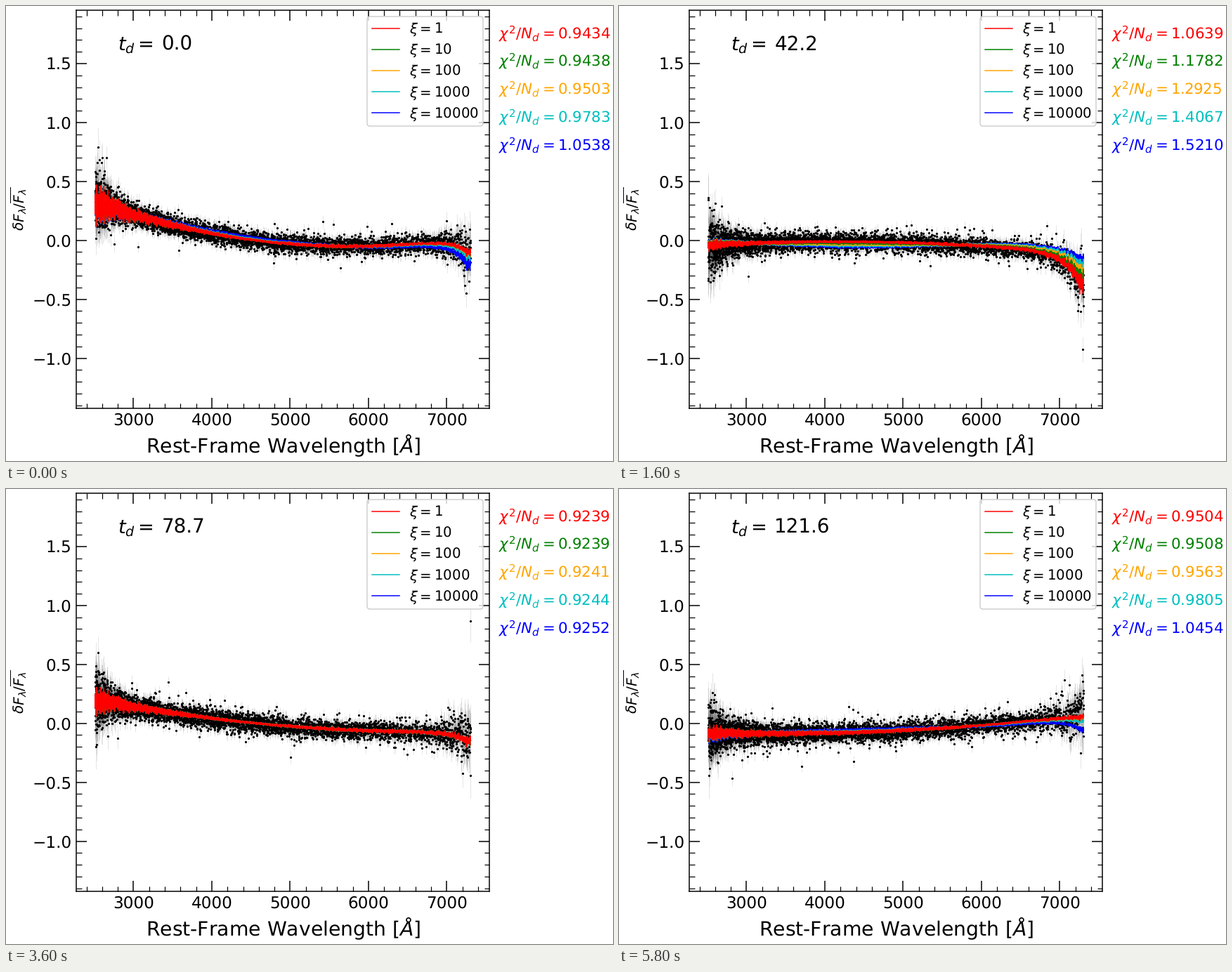
A matplotlib script for the animation above (6000 ms loop, 864x648 px).

```python
import numpy as np
import matplotlib.pyplot as plt
from matplotlib.animation import FuncAnimation
from matplotlib.collections import LineCollection
from matplotlib.patches import FancyBboxPatch
from matplotlib.ticker import AutoMinorLocator, MultipleLocator

W, H = 864, 648
FRAMES, INTERVAL = 30, 200
COLORS = ["r", "g", "orange", "c", "b"]

plt.rcParams.update({"font.family": "DejaVu Sans", "text.hinting": "none"})

# epoch, days, lowest and highest chi2, levels at KNOTS, bend of stiff fits, noise
KNOTS = [2510, 5000, 6700, 7300]
KEYS = np.array([
    (0, 0.0, 0.9434, 1.0538, 0.32, -0.03, -0.02, -0.12, 0.02, 0.09),
    (5, 37.3, 0.9866, 1.1084, -0.11, -0.25, -0.40, -0.80, -0.04, 0.25),
    (8, 42.2, 1.0639, 1.5210, -0.04, -0.02, -0.08, -0.42, -0.04, 0.08),
    (14, 62.6, 0.9383, 1.0278, -0.06, -0.125, -0.11, -0.20, -0.02, 0.10),
    (18, 78.7, 0.9239, 0.9252, 0.20, -0.025, -0.07, -0.17, 0.0, 0.10),
    (25, 104.0, 0.9035, 1.0597, 0.07, 0.21, 0.345, 0.62, 0.045, 0.17),
    (29, 121.6, 0.9504, 1.0454, -0.08, -0.06, 0.025, 0.05, 0.02, 0.11),
])

# Logarithmic wavelength grid
lam = 2510 * 10 ** (1e-4 * np.arange(4640))
blue_end = np.exp(-(lam - 2510) / 190)
red_end = np.exp((lam - 7300) / 200)
wave = np.cos(np.pi * (lam - 4400) / 2600) - 5 * red_end

# Relative jitter shared by all fits
ripple = np.random.default_rng(1).standard_normal(lam.size).clip(-2.8, 2.8)
ripple *= 0.055 + 0.14 * np.exp(-(lam - 2510) / 350) + 0.04 * red_end


def state(i):
    return [np.interp(i, KEYS[:, 0], col) for col in KEYS[:, 1:].T]


def continuum(levels):
    """Parabola through three knots with an exponential tail to the last."""
    x = np.array(KNOTS) / 1000
    coef = np.polyfit(x[:3], levels[:3], 2)
    tail = levels[3] - np.polyval(coef, x[3])
    return np.polyval(coef, lam / 1000) + tail * red_end


fig = plt.figure(figsize=(W / 72, H / 72), dpi=72, facecolor="white")
ax = fig.add_axes([100 / W, 75 / H, 588 / W, 567 / H])
ax.set(xlim=(2269, 7544), ylim=(-1.426, 1.953))
for axis, step in ((ax.xaxis, 1000), (ax.yaxis, 0.5)):
    axis.set_major_locator(MultipleLocator(step))
    axis.set_minor_locator(AutoMinorLocator(5))
ax.tick_params(which="both", direction="in", top=True, right=True)
ax.tick_params(which="major", length=15, width=1.5, labelsize=23.1, pad=6.5)
ax.tick_params(which="minor", length=7.5, width=1.2)
for spine in ax.spines.values():
    spine.set_linewidth(1.5)

bars = LineCollection([], colors="k", alpha=0.13, linewidths=0.8, zorder=1)
ax.add_collection(bars, autolim=False)
dots, = ax.plot([], [], "o", color="k", ms=3.2, mew=0, zorder=2)
fits = [ax.plot([], [], color=c, lw=1.5, zorder=2.4 - 0.05 * n)[0]
        for n, c in enumerate(COLORS)]

# Pixel-based layer for labels and legend
hud = fig.add_axes([0, 0, 1, 1], zorder=5)
hud.set(xlim=(0, W), ylim=(H, 0))
hud.axis("off")


def label(x, y, s, size, **kw):
    return hud.text(x, y, s, fontsize=size, va="baseline", **kw)


label(395, 636, r"Rest-Frame Wavelength [$\AA$]", 28.3, ha="center")
label(26, 289, r"$\delta F_\lambda/\overline{F_\lambda}$", 20.3,
      ha="center", rotation=90, rotation_mode="anchor")
label(159, 63, r"$t_d=$", 27.3)
days = label(221.3, 63, "", 27.7)

hud.add_patch(FancyBboxPatch((514, 15), 165, 156, fc=(1, 1, 1, 0.8), ec="0.8",
                             lw=1.4, boxstyle="round,pad=0,rounding_size=4"))
chi = []
for n, c in enumerate(COLORS):
    y = 31.7 + 30.1 * n
    hud.plot([521, 560], [y, y], color=c, lw=1.5)
    label(574, y + 7.3, rf"$\xi={10 ** n}$", 19.8)
    chi.append(label(701, 46 + 39.8 * n, "", 21.4, color=c))


def draw(i):
    rng = np.random.default_rng(100 + i)
    day, low, high, *levels, bend, noise = state(i)
    level = continuum(levels)

    # Noisy epochs scatter more everywhere and drift up at the red end
    sigma = 0.032 + 0.08 * noise + 0.11 * blue_end + noise * red_end
    flux = level + 24 * noise ** 3 * red_end
    flux = flux + 0.9 * sigma * rng.standard_t(8, lam.size)
    err = sigma * rng.uniform(0.9, 1.4, lam.size)
    bars.set_segments(np.stack([np.column_stack([lam, flux - err]),
                                np.column_stack([lam, flux + err])], axis=1))
    dots.set_data(lam, flux)

    # Stiffer fits move away from the best one
    stiff = np.linspace(0, 1, len(COLORS)) ** (3 + 50 * bend)
    for line, text, s in zip(fits, chi, stiff):
        y = level + s * bend * wave
        line.set_data(lam, y + ripple * (np.abs(y) + 0.07))
        text.set_text(rf"$\chi^2/N_d={low + s * (high - low):.4f}$")

    days.set_text(f"{day:.1f}")
    return [bars, dots, *fits, days, *chi]


anim = FuncAnimation(fig, draw, frames=FRAMES, interval=INTERVAL,
                     repeat=True, repeat_delay=0, blit=False)
plt.show()
```
